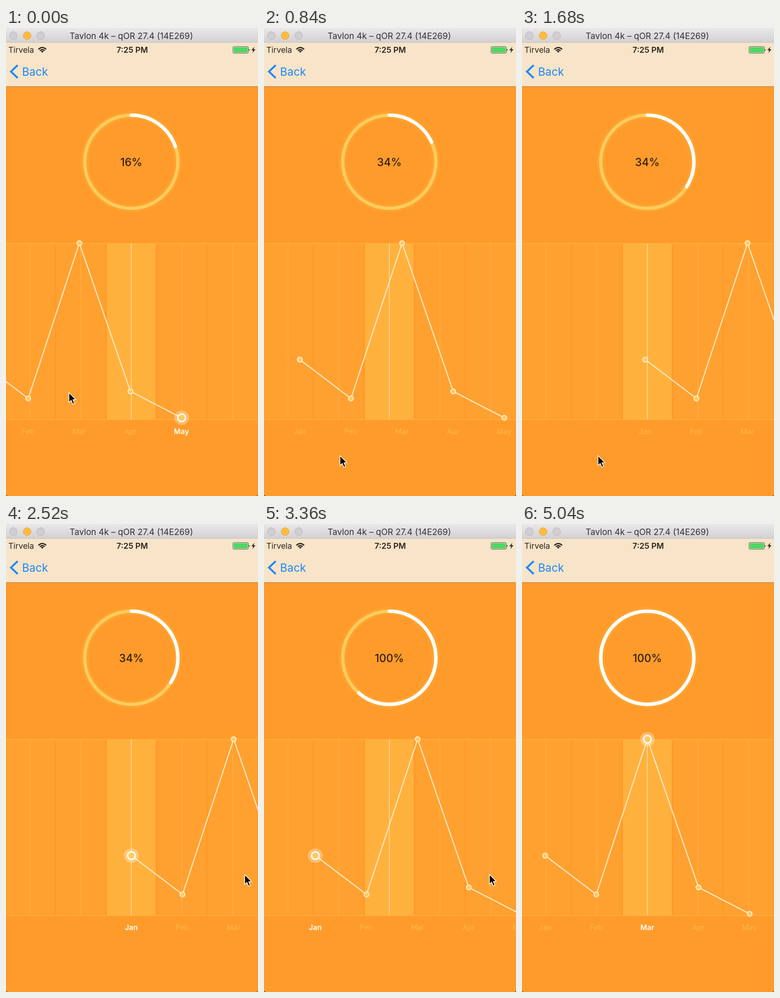
These frames come from a looping animation (549 by 1020 pixels, 6180 ms). An HTML page:

```html
<!DOCTYPE html>
<html lang="en">
<head>
<meta charset="utf-8">
<title>Scrolling line chart</title>
<style>
  html, body { margin: 0; width: 100%; height: 100%; overflow: hidden; background: #ff9b2b; }
  svg { display: block; width: 549px; height: 1020px; font-family: Inter, Roboto, sans-serif; }
  .mid { text-anchor: middle; }
  .month { font-size: 16px; fill: #ffb84c; text-anchor: middle; }
  .month.on { fill: #fff; font-weight: 600; }
  .dot { fill: #ffca5f; stroke: #fff0d6; stroke-width: 2; }
  .on .dot { stroke: #fff; stroke-width: 3; }
  .halo { fill: #fff; opacity: 0; }
  .on .halo { opacity: .3; }
</style>
</head>
<body>
<svg viewBox="0 0 549 1020">
  <defs>
    <linearGradient id="bar" x2="0" y2="1">
      <stop offset="0" stop-color="#eae8ea"/>
      <stop offset="1" stop-color="#d2d0d2"/>
    </linearGradient>
  </defs>
  <rect width="549" height="1020" fill="#ff9b2b"/>

  <!-- title bar -->
  <rect width="549" height="32" fill="url(#bar)"/>
  <rect y="31" width="549" height="1" fill="#c4bfba"/>
  <g fill="#d0ced0" stroke="#b5b3b5">
    <circle cx="16" cy="16.5" r="8.5"/>
    <circle cx="46" cy="16.5" r="8.5" fill="#fdbc40" stroke="#e3a436"/>
    <circle cx="75.5" cy="16.5" r="8.5"/>
  </g>
  <text class="mid" x="273" y="24" font-size="18.6" fill="#333133">Tavlon 4k – qOR 27.4 (14E269)</text>

  <!-- status and navigation -->
  <rect y="32" width="549" height="95" fill="#f7e4c9"/>
  <rect y="127" width="549" height="1.2" fill="#b98244"/>
  <g fill="#29241d" font-size="17.5">
    <text x="5" y="54">Tirvela</text>
    <text class="mid" x="275" y="54" font-weight="600">7:25 PM</text>
  </g>
  <g fill="none" stroke="#29241d" stroke-width="2.6">
    <path d="M70.5 46.5Q79 38.5 87.5 46.5M73.8 49.6Q79 44.8 84.2 49.6"/>
    <path d="M79 54L76 50.8Q79 48.6 82 50.8Z" fill="#29241d" stroke="none"/>
  </g>
  <rect x="494.5" y="40.5" width="33.5" height="14.5" rx="2.5" fill="#f7e4c9" stroke="#55504a"/>
  <rect x="496" y="42" width="30.5" height="11.5" rx="1" fill="#4fd763"/>
  <path d="M529 45.5Q532 47.7 529 50Z" fill="#29241d"/>
  <path d="M541 41L534.5 48.6H538.6L536.8 54.5L543.5 46.5H539.4Z" fill="#29241d"/>
  <path d="M25.5 81L10.7 95L25.5 109" fill="none" stroke="#1d86f8" stroke-width="4"/>
  <text x="35" y="103.7" font-size="24.2" fill="#1d86f8">Back</text>

  <!-- progress ring -->
  <g fill="none" transform="translate(273 291.5)">
    <circle r="101.5" stroke="#ffb640" stroke-width="17" opacity=".25"/>
    <circle r="101.5" stroke="#ffcd5c" stroke-width="7"/>
    <circle id="arc" r="101.5" stroke="#fff" stroke-width="7.6" stroke-linecap="round"
      pathLength="100" transform="rotate(-90)"/>
  </g>
  <text id="pct" class="mid" x="273" y="300.5" font-size="23.6" font-weight="500" fill="#30200f"></text>

  <g id="grid"></g>
  <polyline id="line" fill="none" stroke="#ffebc8" stroke-width="2.3" stroke-linejoin="round"/>
  <g id="points"></g>
  <path d="M0 1016Q0 1020 4 1020H0ZM549 1016Q549 1020 545 1020H549Z" fill="#2a1c0c"/>
  <path id="cursor" d="M0 0V21.5L4.9 17L8.5 25.3L12.2 23.7L8.7 15.6H15.2Z"
    fill="#000" stroke="#fff" stroke-width="1.5" stroke-linejoin="round"/>
</svg>
<script>
const LOOP = 6180, STEP = 210, LAST = 24;
const TOP = 469, BOTTOM = 853.5, CENTER = 273.2, GAP = 111.4;
const months = ['Jan', 'Feb', 'Mar', 'Apr', 'May'];
const values = [34, 12, 100, 16, 1];
const $ = id => document.getElementById(id);

function add(parent, tag, attrs, text) {
  const node = document.createElementNS('http://www.w3.org/2000/svg', tag);
  for (const key in attrs) node.setAttribute(key, attrs[key]);
  if (text) node.textContent = text;
  return parent.appendChild(node);
}

// Fixed columns behind the scrolling line
for (let i = -2; i <= 2; i++) {
  const x = 273 + i * 110.25, on = i === 0;
  add($('grid'), 'rect', { x: x - 53, y: TOP, width: 106, height: BOTTOM - TOP, fill: on ? '#ffb13e' : '#ffa131' });
  add($('grid'), 'rect', { x: x - .7, y: TOP, width: 1.4, height: BOTTOM - TOP, fill: on ? '#ffe2a6' : '#ffb144' });
}
for (const y of [TOP, BOTTOM - .5])
  add($('grid'), 'rect', { x: 0, y, width: 549, height: 1.2, fill: '#ffb548' });

const heights = values.map(v => BOTTOM - v / 100 * (BOTTOM - TOP));
const points = months.map((name, i) => {
  const group = add($('points'), 'g', {});
  add(group, 'circle', { class: 'halo', cy: heights[i], r: 15.8 });
  const dot = add(group, 'circle', { class: 'dot', cy: heights[i] });
  const label = add(group, 'text', { y: 884.7, x: -.3 }, name);
  return { group, dot, label };
});

const rest = i => CENTER - GAP * i;

// Position of the first point: drags followed by decaying snaps
function firstX(s) {
  if (s < 3) return rest(3) - 2 * .4 ** s;
  if (s === 3) return -35;
  if (s < 10) return rest(0) - 195.2 * .392 ** (s - 4);
  if (s < 15) return rest(0);
  if (s < 19) return rest(2) + 186.4 * .33 ** (s - 15);
  return rest(2);
}

function selected(s) {
  if (s < 2) return 4;
  if (s < 4) return 3;
  if (s < 10) return -1;
  return s < 19 ? 0 : 2;
}

// Ring eases over 800 ms; `lead` is the progress already made at step `at`
function ramp(from, to, s, at, lead) {
  const p = Math.min(1, lead + (s - at) * STEP / 800);
  return from + (to - from) * p * p * (3 - 2 * p);
}

function ring(s) {
  if (s < 4) return 16 + 3.7 * .25 ** s;
  return s < 15 ? ramp(16, 34, s, 4, .21) : ramp(34, 100, s, 15, .18);
}

// [step, x, y]: pointer stops, linear between them
const path = [
  [0, 137, 794.5], [2, 118, 926], [3, 145, 932], [4, 165.5, 932], [9, 165.5, 932],
  [12, 520, 764], [13, 526, 763.5], [14, 526, 763.5], [15, 491, 763.5], [16, 491, 763.5],
  [17, 402, 912], [18, 384, 924], [19, 384, 925], [20, 396, 890], [21, 421, 793], [22, 400, 321], [23, 400, -60]
];

function pointer(s) {
  const n = path.findIndex(p => p[0] >= s);
  if (n < 1) return path.at(n).slice(1);
  const [s0, x0, y0] = path[n - 1], [s1, x1, y1] = path[n];
  const k = (s - s0) / (s1 - s0);
  return [x0 + (x1 - x0) * k, y0 + (y1 - y0) * k];
}

function draw(ms) {
  const s = Math.min(LAST, Math.floor(ms % LOOP / STEP));
  const x0 = firstX(s), sel = selected(s);
  $('line').setAttribute('points', heights.map((y, i) => `${x0 + GAP * i},${y}`).join(' '));
  points.forEach((p, i) => {
    const on = i === sel;
    p.group.setAttribute('transform', `translate(${x0 + GAP * i} 0)`);
    p.group.setAttribute('class', on ? 'on' : '');
    p.dot.setAttribute('r', on ? 8.3 : 5.3);
    p.label.setAttribute('class', on ? 'month on' : 'month');
  });
  $('arc').setAttribute('stroke-dasharray', `${ring(s)} 100`);
  $('pct').textContent = `${s < 4 ? 16 : s < 15 ? 34 : 100}%`;
  $('cursor').setAttribute('transform', `translate(${pointer(s)})`);
}

let start;
function tick(now) {
  start ??= now;
  draw(now - start);
  requestAnimationFrame(tick);
}
draw(0);
requestAnimationFrame(tick);
</script>
</body>
</html>
```
